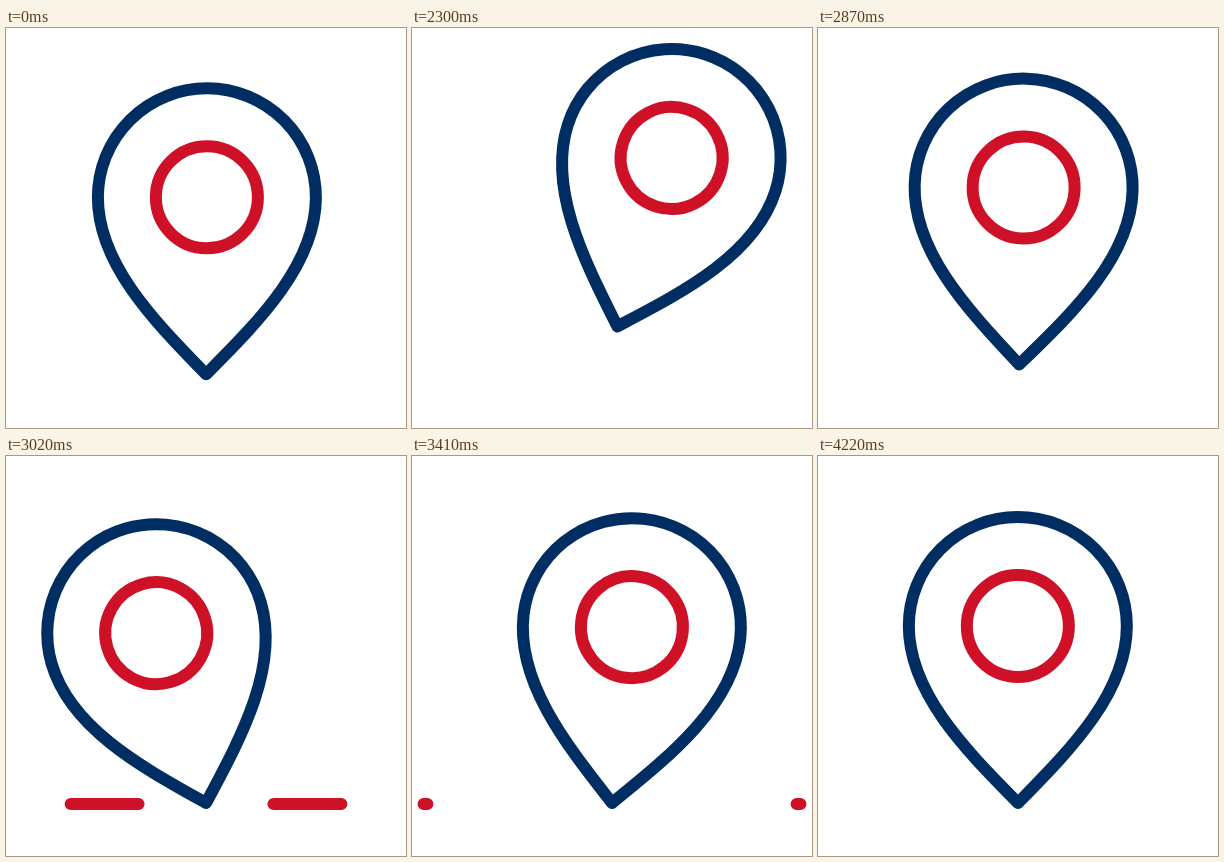
Animation of 400x400 px, one loop 4.25 s. Source, as an HTML page:

```html
<!DOCTYPE html>
<html lang="en">
<head>
<meta charset="utf-8">
<title>Map pin</title>
<style>
  html, body { margin: 0; width: 100%; height: 100%; overflow: hidden; background: #fff; }
  svg { display: block; width: 100%; height: 100%; }
  svg * { fill: none; stroke-width: 12; stroke-linecap: round; stroke-linejoin: round; }
  .navy { stroke: #002d62; }
  .red { stroke: #ce1126; }
</style>
</head>
<body>
<svg viewBox="0 0 400 400">
  <path id="dashes" class="red"/>
  <g id="pin">
    <path class="navy" d="M200 347C150 296 91 238 91 170A109 109 0 0 1 309 170C309 238 250 296 200 347Z"/>
    <circle class="red" cx="200" cy="170" r="51"/>
  </g>
</svg>
<script>
  const LOOP = 4250, REST = 2030, STEP = 30;
  const pin = document.getElementById('pin');
  const dashes = document.getElementById('dashes');

  const sineOut = u => Math.sin(u * Math.PI / 2);
  const sineIn = u => 1 - Math.cos(u * Math.PI / 2);
  const sineInOut = u => (1 - Math.cos(u * Math.PI)) / 2;
  const quadOut = u => 1 - (1 - u) ** 2;

  // Each key: time, value, easing towards that value
  const tilt = [[1996, 0], [2596, 25, sineOut], [2653, 25, sineOut], [3057, -17.2, sineInOut],
                [3515, 9.8, sineInOut], [3865, -3.9, sineInOut], [4250, 0, sineInOut]];
  const lift = [[1996, 0], [2596, 68, sineOut], [2900, 0, sineIn]];
  const head = [[2880, 165], [3220, 11.5, quadOut]];
  const tail = [[2960, 165], [3496, 11.5, quadOut]];

  function at(keys, t) {
    let [t0, v0] = keys[0];
    if (t <= t0) return v0;
    for (const [t1, v1, ease] of keys.slice(1)) {
      if (t < t1) return v0 + (v1 - v0) * ease((t - t0) / (t1 - t0));
      [t0, v0] = [t1, v1];
    }
    return v0;
  }

  function draw(ms) {
    const now = ms % LOOP;
    // Long rest, then a fixed step rate
    const t = now < REST ? REST - STEP : REST + Math.floor((now - REST) / STEP) * STEP;

    const y = at(lift, t);
    pin.setAttribute('transform', `translate(${y * 0.11} ${-y}) rotate(${at(tilt, t)} 200 347)`);

    const a = at(head, t), b = at(tail, t);
    const shown = t > 2880 && t < 3490;
    dashes.setAttribute('d', shown ? `M${a} 348H${b}M${400 - a} 348H${400 - b}` : '');
  }

  const start = performance.now();
  function tick() {
    draw(performance.now() - start);
    requestAnimationFrame(tick);
  }
  tick();
</script>
</body>
</html>
```
